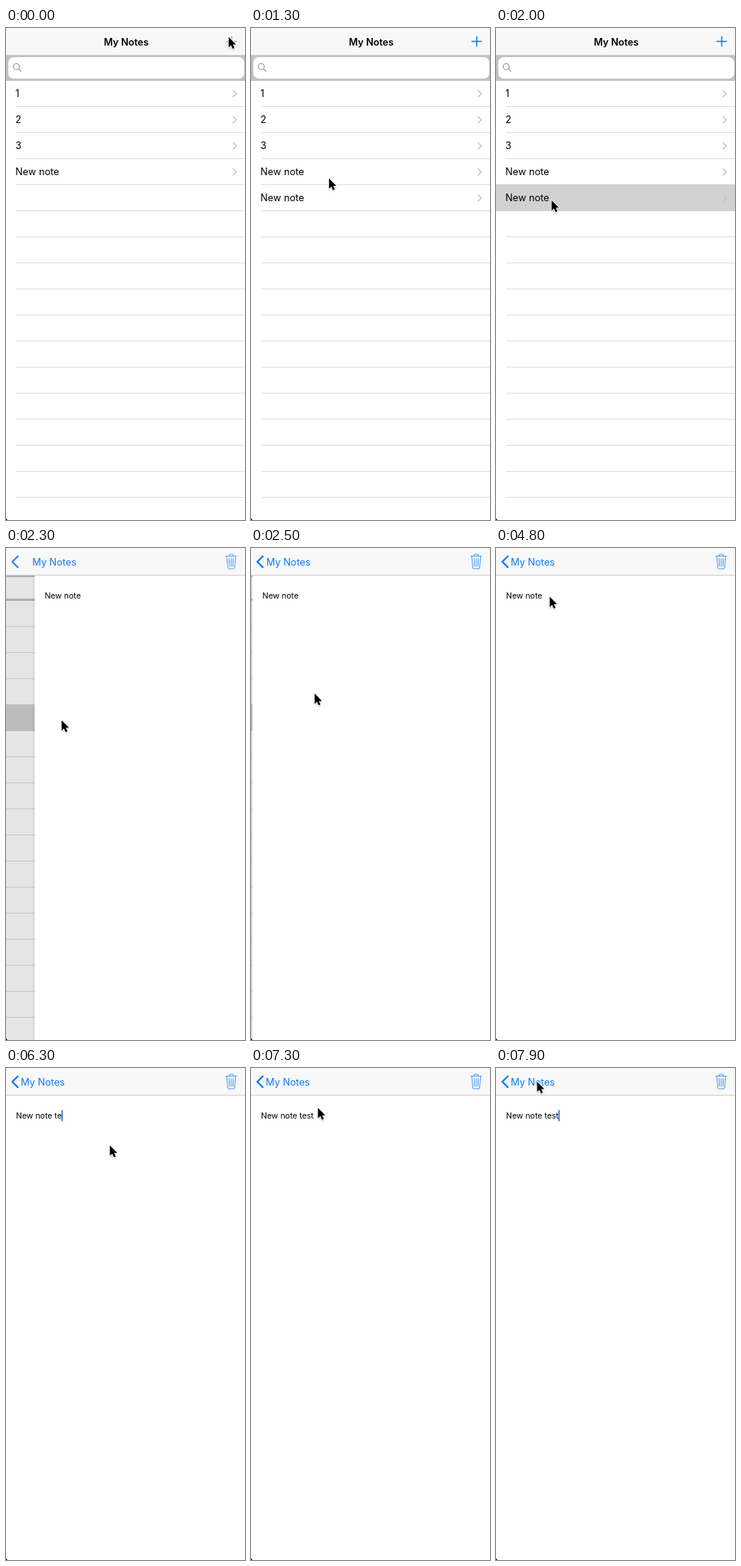
Animation, 312 px wide and 642 px high, one loop 8 s. Source, as an HTML page:

```html
<!DOCTYPE html>
<html lang="en">
<head>
<meta charset="utf-8">
<title>My Notes</title>
<style>
  html, body { margin: 0; width: 100%; height: 100%; overflow: hidden; background: #fff; }
  svg { display: block; width: 100%; height: 100%; }
  text { font: 12.7px Inter, Roboto, sans-serif; white-space: pre; }
  .bar { text-anchor: middle; }
  .title { font-weight: 600; }
  .body { font-size: 10.5px; }
  .blue { fill: #0a7af5; }
  .icon { fill: none; stroke: #0a7af5; }
  .rule { stroke: #dedee1; }
  .disclosure { fill: none; stroke: #c3c3c8; stroke-width: 1.4; }
</style>
</head>
<body>
<svg viewBox="0 0 312 642">
  <defs>
    <linearGradient id="edge">
      <stop offset="0" stop-opacity="0"/>
      <stop offset="1" stop-opacity=".08"/>
    </linearGradient>
    <filter id="soft" x="-50%" y="-50%" width="200%" height="200%">
      <feGaussianBlur stdDeviation=".9"/>
    </filter>
    <path id="arrow" d="M0 0V13.6L3.1 10.8L5.2 15.5L7.6 14.4L5.5 9.8H9.6Z"/>
  </defs>
  <rect width="312" height="642" fill="#fff"/>

  <g id="list">
    <rect y="36" width="312" height="33" fill="#c1c1c6"/>
    <rect x="3" y="38" width="308" height="28" rx="7" fill="#fff"/>
    <g fill="none" stroke="#8e8e93" stroke-width="1.1">
      <circle cx="13.4" cy="50.4" r="3.9"/>
      <path d="M16.2 53.2L19.8 56.8"/>
    </g>
    <g id="rules"></g>
    <rect id="highlight" y="204" width="312" height="35" fill="#d1d1d1"/>
    <g id="rows"></g>
  </g>
  <rect id="dim" y="36" width="312" height="606"/>

  <g id="page">
    <rect x="-4" y="36" width="4" height="606" fill="url(#edge)"/>
    <rect y="36" width="312" height="606" fill="#fff"/>
    <text id="note" class="body" x="13" y="66.4"></text>
    <rect id="caret" y="55" width="1.7" height="14.5" fill="#3d6de0"/>
  </g>

  <rect width="312" height="35" fill="#f8f8f8"/>
  <rect y="35" width="312" height="1" fill="#cdcdcf"/>
  <text id="title" class="bar title" y="22.5">My Notes</text>
  <path id="plus" class="icon" stroke-width="1.5" d="M287.8 17.5H301.4M294.6 10.7V24.3"/>
  <g id="detailBar">
    <path class="icon" stroke-width="2.2" d="M16 10.3L8.3 18L16 25.7"/>
    <text id="back" class="bar blue" y="22.5">My Notes</text>
    <path class="icon" stroke-width=".9" opacity=".85" d="M286.7 10.6H301.3M291.4 10.6V9Q291.4 8.2 292.2 8.2H295.8Q296.6 8.2 296.6 9V10.6
      M288.2 10.8L289.6 26Q289.7 27 290.7 27H297.3Q298.3 27 298.4 26L299.8 10.8
      M291.2 13.3L291.8 24.3M294 13.3V24.3M296.8 13.3L296.2 24.3"/>
  </g>

  <path d="M0 639.8L2.2 642H0Z" fill="#222"/>
  <g id="cursor">
    <use href="#arrow" y="1.6" opacity=".45" filter="url(#soft)"/>
    <use href="#arrow" stroke="#fff" stroke-width="2" stroke-linejoin="round"/>
    <use href="#arrow"/>
  </g>
</svg>

<script>
const LOOP = 8000, TICK = 100, WIDTH = 312;
const ROW = 34, FIRST_ROW = 69;
const PRESS_END = 100, ROW_ADDED = 700, ROW_TAPPED = 2000, PUSH = 2100, NOTE_TAPPED = 5200;
const byId = id => document.getElementById(id);
const opacity = (id, value) => byId(id).setAttribute('opacity', value);
const move = (id, x, y = 0) => byId(id).setAttribute('transform', `translate(${x} ${y})`);
const clamp = v => Math.min(1, Math.max(0, v));

for (let i = 1; i <= 16; i++) {
  const y = FIRST_ROW + i * ROW - .5;
  byId('rules').innerHTML += `<path class="rule" d="M13 ${y}H312"/>`;
}
byId('rows').innerHTML = ['1', '2', '3', 'New note', 'New note'].map((label, i) => {
  const y = FIRST_ROW + i * ROW;
  return `<g><text x="12.3" y="${y + 21.2}">${label}</text>
    <path class="disclosure" d="M296 ${y + 12.2}L300.8 ${y + 16.7}L296 ${y + 21.2}"/></g>`;
}).join('');
const newRow = byId('rows').lastElementChild;

const plusButton = { x: 290.7, y: 11.7 };
const glides = [
  { from: 700, to: 1600, x: 72.6, y: 224.8 },
  { from: 2400, to: 3100, x: 119.6, y: 67.7 },
  { from: 3100, to: 3300, x: 79.6, y: 60.6 },
  { from: 4700, to: 5000, x: 60.6, y: 66.5 },
  { from: 5100, to: 5500, x: 135.6, y: 101 },
  { from: 6900, to: 7900, x: 53.6, y: 17.7 }
];
const NOTE = 'New note', TYPED = ' test';
const keyTimes = [5400, 6200, 6300, 6500, 6600];

function cursorAt(t) {
  return glides.reduce((p, { from, to, x, y }) => {
    const k = Math.sin(clamp((t - from) / (to - from)) * Math.PI / 2);
    return { x: p.x + (x - p.x) * k, y: p.y + (y - p.y) * k };
  }, plusButton);
}

// Critically damped spring: remaining share of the push
function pushRest(t) {
  const u = Math.max(0, t - PUSH) * .0183;
  return (1 + u) * Math.exp(-u);
}

// Solid after each tap or key, then a soft blink once a second
function caretOpacity(t) {
  const since = t - [NOTE_TAPPED, ...keyTimes].findLast(time => time <= t);
  if (t < NOTE_TAPPED) return 0;
  return since < 300 ? 1 : clamp(.5 + .62 * Math.cos((since - 200) / 500 * Math.PI));
}

function render(t) {
  const rest = pushRest(t), done = 1 - rest;
  move('list', -.3 * WIDTH * done);
  move('page', WIDTH * rest);
  opacity('page', t > PUSH ? 1 : 0);
  opacity('dim', .115 * done);
  newRow.setAttribute('opacity', t >= ROW_ADDED ? 1 : 0);
  opacity('highlight', t >= ROW_TAPPED ? 1 : 0);

  // Both titles share one path and cross-fade, a touch behind the page
  const titleX = 48 + 109 * rest ** .93;
  for (const id of ['title', 'back']) byId(id).setAttribute('x', titleX);
  opacity('title', rest);
  opacity('detailBar', done);
  opacity('plus', t < PRESS_END ? .55 : rest);

  const note = byId('note');
  note.textContent = NOTE + TYPED.slice(0, keyTimes.filter(time => time <= t).length);
  byId('caret').setAttribute('x', 12.7 + note.getComputedTextLength());
  opacity('caret', caretOpacity(t));

  const { x, y } = cursorAt(t);
  move('cursor', x, y);
}

let shown = -1;
function frame() {
  // Small lead so a tick is never painted late
  const t = Math.floor((performance.now() + 10) % LOOP / TICK) * TICK;
  if (t !== shown) render(shown = t);
  requestAnimationFrame(frame);
}
frame();
</script>
</body>
</html>
```
